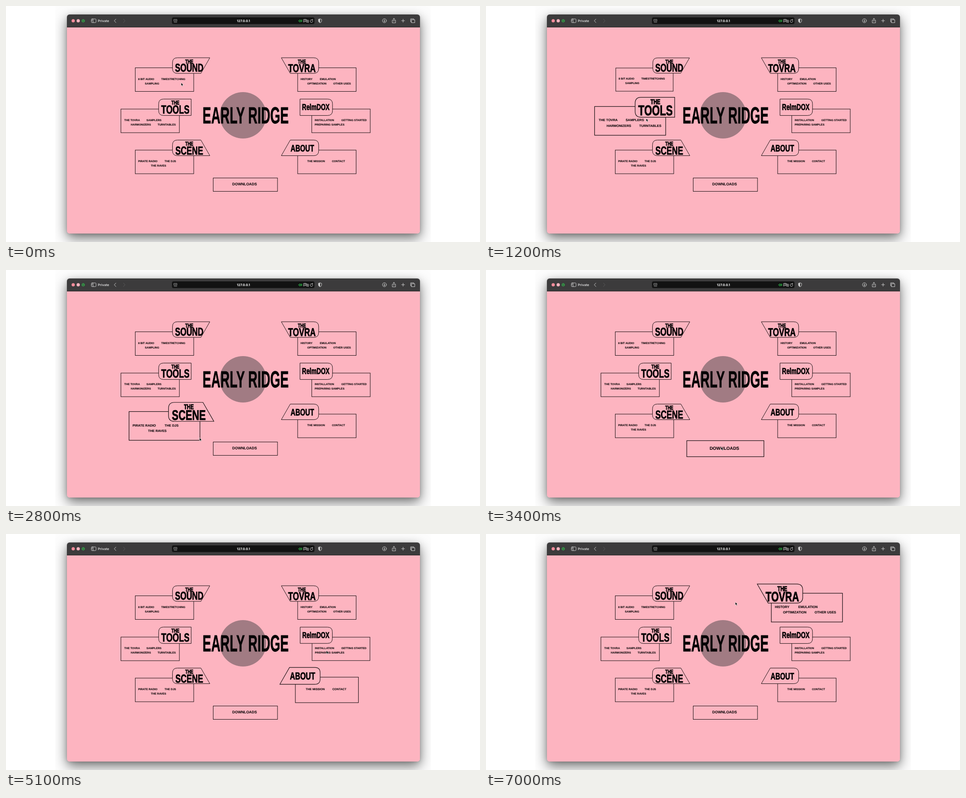
An HTML page that plays this animation: 1058 px wide and 529 px high, repeating every 8.7 s.

```html
<!DOCTYPE html>
<html lang="en">
<head>
<meta charset="utf-8">
<title>Menu hover demo</title>
<style>
  html, body { margin: 0; width: 100%; height: 100%; overflow: hidden; background: #fff; }
  .desk { position: absolute; left: 110px; top: 0; width: 838px; height: 529px; overflow: hidden; background: #fdfdfd; }
  .window {
    position: absolute; left: 25.5px; top: 18.5px; width: 788px; height: 491px;
    border-radius: 6px; background: linear-gradient(#3c3b3c 28.5px, #2c2a2b 28.5px 29.2px, #fdb4c0 29.2px);
    box-shadow: 0 0 1px rgba(0,0,0,.45), 0 10px 28px rgba(0,0,0,.56), 0 2px 8px rgba(0,0,0,.12);
  }
  svg { position: absolute; left: 0; top: 0; width: 1058px; height: 529px; display: block; }
  text { text-rendering: geometricPrecision; font-family: "Liberation Sans", Arial, sans-serif; font-weight: 700; }
  .ui { font-family: Inter, Roboto, sans-serif; font-weight: 600; }
  .line { fill: none; stroke: #120c0e; stroke-width: 1; }
  .tab { fill: #fdb4c0; }
  .title { text-anchor: middle; fill: #050304; stroke: #050304; stroke-width: .8; }
  .link { font-size: 6.05px; fill: #120c0e; stroke: #120c0e; stroke-width: .12; }
  .icon { fill: none; stroke: #cfcfcf; stroke-width: 1; stroke-linecap: round; stroke-linejoin: round; }
  .green { stroke: #2fc94c; }
</style>
</head>
<body>
<div class="desk"><div class="window"></div></div>
<svg viewBox="0 0 1058 529">
  <g id="toolbar">
    <circle cx="150" cy="33.2" r="3.6" fill="#f78d9c"/>
    <circle cx="161.2" cy="33.2" r="3.6" fill="#fcb3bf"/>
    <circle cx="172.4" cy="33.2" r="3.1" class="icon green" stroke-dasharray="3 .8"/>
    <path class="icon green" d="M171 35v-2a1.4 1.4 0 0 1 2.8 0v2"/>
    <rect class="icon" x="190.5" y="29" width="10.5" height="8.2" rx="1.6"/>
    <path class="icon" d="M194.2 29v8.2M192 31.2h.6M192 33h.6"/>
    <text class="ui" x="205" y="36" font-size="7.4" fill="#dedede">Private</text>
    <path class="icon" stroke-width="1.2" d="M245.4 29.2L241.6 33.2L245.4 37.2"/>
    <path class="icon" style="stroke:#5c5c5c" d="M262 29.2L265.8 33.2L262 37.2"/>
    <rect x="370.5" y="25.5" width="318" height="15" rx="3.5" fill="#121212"/>
    <path class="icon" style="stroke:#8f8f8f" d="M375 30h6.5v4.2H375zM375 36.6h6.5M377 32h2.5"/>
    <text class="ui" x="530" y="36" font-size="7.2" fill="#fff" text-anchor="middle" style="font-weight:700">127.0.0.1</text>
    <path class="icon green" d="M653 33.2l3.6-2.4v5zM658.6 31.6v3.4M660.4 31v4.6"/>
    <path class="icon" d="M664.8 30h5.4v4.6h-3.6l-1.8 1.4zM670.2 31.8h4.6v5.4l-1.6-1.2h-3M666.4 32h2M672 34h1.4"/>
    <path class="icon" d="M684 31.6a3 3 0 1 0 .9 2.4M684.4 29.6v2.2h-2.2"/>
    <path class="icon" d="M701 28.8l3.6 1.3v3.2q0 3-3.6 4.4q-3.6-1.4-3.6-4.4v-3.2z"/>
    <path fill="#cfcfcf" d="M701 28.8v8.9q-3.6-1.4-3.6-4.4v-3.2z"/>
    <circle class="icon" cx="844.7" cy="33" r="4.5"/>
    <path class="icon" d="M844.7 30.6v4.6M842.8 33.5l1.9 1.9l1.9-1.9"/>
    <path class="icon" d="M864 31.8h-1.8v6h7.4v-6h-1.8M865.9 34.6v-6.8M864 29.4l1.9-1.9l1.9 1.9"/>
    <path class="icon" d="M882.8 33h7M886.3 29.5v7"/>
    <path class="icon" d="M905 35.4h-1.8v-6.6h7v1.8M905.2 30.8h7.2v6.6h-7.2z"/>
  </g>
  <circle cx="529" cy="245" r="52" fill="#a17b83"/>
  <text class="title" font-size="52" transform="translate(535 263) scale(.55 1)">EARLY RIDGE</text>
  <g id="menu"></g>
  <path id="cursor" d="M0 0V6.8L1.6 5.4L2.7 8L4 7.4L2.9 4.9H5Z" fill="#000" stroke="#fff" stroke-width=".6"/>
</svg>
<script>
const LOOP = 8700, STEP = 100, LAST = 7000;
const FADE = 500, GROW = .2;

// box: x, y, w, h. tab: centre, half size, x of the free edge at top and bottom.
// hover: time in and out. titles: label, x, y, size. links: label, x, y.
const panels = [
  { box: [288.5, 138.5, 130.5, 53], tab: [413.3, 133.5, 41.7, 17.5, 41.7, 21.7], hover: [0, 800],
    titles: [['THE', 409, 128.8, 12.8], ['SOUND', 409, 147.4, 25.2]],
    links: [['8 BIT AUDIO', 295, 165.5], ['TIMESTRETCHING', 346.5, 165.5], ['SAMPLING', 310, 175.7]] },
  { box: [256.5, 231, 130.5, 53], tab: [377, 227, 36.3, 18.4, 36.3, 36.3], hover: [840, 1970],
    titles: [['THE', 378, 221, 12.8], ['TOOLS', 378, 241.4, 26.3]],
    links: [['THE TOVRA', 264, 258.2], ['SAMPLERS', 313.5, 258.2], ['HARMONIZERS', 278.5, 268.3], ['TURNTABLES', 338.5, 268.3]] },
  { box: [288.5, 323, 130.5, 53], tab: [413.3, 318, 41.7, 17.5, 21.7, 41.7], hover: [1990, 2750],
    titles: [['THE', 409, 313.4, 12.8], ['SCENE', 409, 333, 25.8]],
    links: [['PIRATE RADIO', 295, 350.4], ['THE DJS', 354, 350.4], ['THE RAVES', 323.5, 360.3]] },
  { box: [651, 138.5, 130.5, 53], tab: [656.2, 133.5, 41.7, 17.5, 41.7, 21.7], flip: true, hover: [5900, 6880],
    titles: [['THE', 660.5, 128.8, 12.8], ['TOVRA', 660.5, 147.8, 25.2]],
    links: [['HISTORY', 657.5, 165.5], ['EMULATION', 700.5, 165.5], ['OPTIMIZATION', 672.5, 175.7], ['OTHER USES', 730.5, 175.7]] },
  { box: [682.5, 231, 130.5, 53], tab: [692.5, 227, 36.3, 18.4, 36.3, 36.3], flip: true, hover: [4950, 5800],
    titles: [['RelmDOX', 691.5, 232.6, 19]],
    links: [['INSTALLATION', 689, 258.2], ['GETTING STARTED', 748.5, 258.2], ['PREPARING SAMPLES', 689, 268.3]] },
  { box: [651, 323, 130.5, 53], tab: [656.2, 318, 41.7, 17.5, 21.7, 41.7], flip: true, hover: [3750, 4850],
    titles: [['ABOUT', 661.5, 325.8, 21]],
    links: [['THE MISSION', 672.5, 350.4], ['CONTACT', 727.5, 350.4]] },
  { box: [462.5, 385.5, 143.5, 30], hover: [2850, 3640],
    links: [['DOWNLOADS', 505, 402.3, 8.25]] }
];

// time, x, y of the pointer tip
const path = [
  [0, 391, 172], [400, 386, 166], [750, 380, 186], [1200, 357.5, 252], [1650, 362, 258],
  [2100, 388.5, 335], [2450, 392, 346], [2800, 432, 376], [3100, 492, 394], [3400, 524.5, 396.5],
  [3650, 566, 392], [4000, 646, 356], [4300, 674, 341], [4650, 704, 332], [5000, 716, 272],
  [5400, 706, 236], [5800, 689.5, 201.5], [6200, 674, 160], [6600, 656, 146], [7000, 556.5, 152.5]
];

const NS = 'http://www.w3.org/2000/svg';
const add = (parent, tag, attrs, label) => {
  const el = document.createElementNS(NS, tag);
  for (const k in attrs) el.setAttribute(k, attrs[k]);
  if (label) el.textContent = label;
  return parent.appendChild(el);
};

function tabShape([, , w, h, top, bottom], r = 11) {
  return `M${r - w} ${-h}H${top}L${bottom} ${h}H${r - w}Q${-w} ${h} ${-w} ${h - r}V${r - h}Q${-w} ${-h} ${r - w} ${-h}Z`;
}

function build(p) {
  const [x, y, w, h] = p.box;
  const menu = document.getElementById('menu');
  const part = (cx, cy) => {
    const el = add(menu, 'g', {});
    p.parts.push({ el, cx, cy });
    return el;
  };
  p.parts = [];
  const body = part(x + w / 2, y + h / 2);
  add(body, 'rect', { class: 'line', x, y, width: w, height: h });
  for (const [label, lx, ly, size] of p.links) {
    const t = add(body, 'text', { class: 'link', x: lx, y: ly }, label);
    if (size) t.style.fontSize = size + 'px';
  }
  if (!p.tab) return;
  const [cx, cy] = p.tab;
  const head = part(cx, cy);
  add(head, 'path', {
    class: 'line tab', d: tabShape(p.tab),
    transform: `translate(${cx} ${cy}) scale(${p.flip ? -1 : 1} 1)`
  });
  for (const [label, tx, ty, size] of p.titles)
    add(head, 'text', { class: 'title', 'font-size': size, transform: `translate(${tx} ${ty}) scale(.7 1)` }, label);
}

// cubic-bezier(.68, -.55, .265, 1.55): pulls back first, then overshoots
function backEase(p) {
  if (p <= 0) return 0;
  if (p >= 1) return 1;
  const curve = (a, b, u) => 3 * a * u * (1 - u) ** 2 + 3 * b * u * u * (1 - u) + u ** 3;
  let lo = 0, hi = 1;
  for (let i = 0; i < 24; i++) {
    const mid = (lo + hi) / 2;
    if (curve(.68, .265, mid) < p) lo = mid; else hi = mid;
  }
  return curve(-.55, 1.55, lo);
}

// Catmull-Rom through the pointer stops
function pointer(t) {
  let i = 0;
  while (i < path.length - 2 && t >= path[i + 1][0]) i++;
  const at = n => path[Math.max(0, Math.min(path.length - 1, n))];
  const [a, b, c, d] = [at(i - 1), at(i), at(i + 1), at(i + 2)];
  const u = Math.min(1, (t - b[0]) / (c[0] - b[0]));
  return [1, 2].map(k => b[k] + .5 * u * (c[k] - a[k] +
    u * (2 * a[k] - 5 * b[k] + 4 * c[k] - d[k] + u * (3 * (b[k] - c[k]) + d[k] - a[k]))));
}

const cursor = document.getElementById('cursor');

function draw(now) {
  const t = Math.min(LAST, Math.floor(now % LOOP / STEP) * STEP);
  for (const p of panels) {
    const [enter, leave] = p.hover;
    const s = 1 + GROW * (backEase((t - enter) / FADE) - backEase((t - leave) / FADE));
    for (const { el, cx, cy } of p.parts)
      el.setAttribute('transform', `translate(${cx} ${cy}) scale(${s}) translate(${-cx} ${-cy})`);
  }
  cursor.setAttribute('transform', `translate(${pointer(t)})`);
}

panels.forEach(build);
const start = performance.now();
function tick() {
  draw(performance.now() - start);
  requestAnimationFrame(tick);
}
tick();
</script>
</body>
</html>
```
